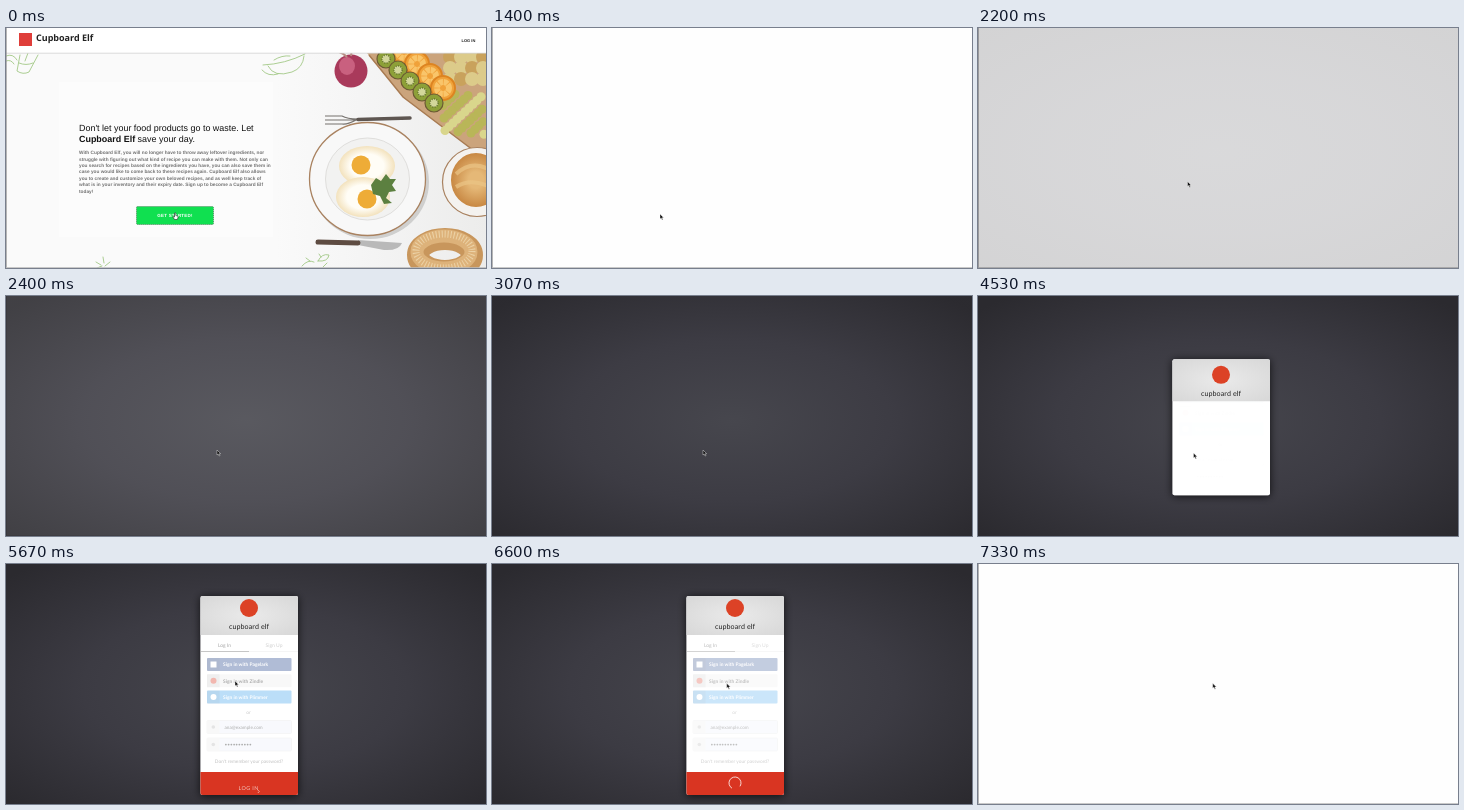
These frames come from a looping animation (480 px wide and 240 px high, 8000 ms). An HTML page:

```html
<!DOCTYPE html>
<html lang="en">
<head>
<meta charset="utf-8">
<title>Recipe app sign-in</title>
<style>
  html, body { margin: 0; width: 100%; height: 100%; overflow: hidden; background: #fff; }
  svg { display: block; width: 480px; height: 240px; text-rendering: geometricPrecision; }
  .page { font-family: "Liberation Sans", Arial, sans-serif; }
  .lock { font-family: Lato, sans-serif; }
  .mid { text-anchor: middle; }
  .doodle { fill: none; stroke: #a3c987; stroke-width: .9; stroke-linecap: round; }
</style>
</head>
<body>
<svg viewBox="0 0 480 240">
  <defs>
    <radialGradient id="dark" cy=".52" r=".68">
      <stop stop-color="#46464d"/><stop offset=".5" stop-color="#3c3b43"/><stop offset="1" stop-color="#2b2a2f"/>
    </radialGradient>
    <radialGradient id="steel" r=".75"><stop stop-color="#eaeaea"/><stop offset="1" stop-color="#d6d6d6"/></radialGradient>
    <linearGradient id="marble"><stop stop-color="#fafafa"/><stop offset=".4" stop-color="#f5f5f5"/><stop offset="1" stop-color="#ececeb"/></linearGradient>
    <radialGradient id="crust"><stop offset=".3" stop-color="#e5b877"/><stop offset="1" stop-color="#c88843"/></radialGradient>
    <radialGradient id="egg"><stop offset=".6" stop-color="#fffdf6"/><stop offset="1" stop-color="#f3e2bd"/></radialGradient>
    <clipPath id="below"><path d="M0 25H480V240H0z"/></clipPath>
    <clipPath id="cardClip"><rect id="cardShape" x="194.500" width="97.500" rx="2"/></clipPath>
    <filter id="shadow" x="-20%" y="-20%" width="140%" height="140%">
      <feDropShadow dx="0" dy="1" stdDeviation="4" flood-color="#000" flood-opacity=".75"/>
    </filter>
  </defs>
  <rect width="480" height="240" fill="#fefefe"/>

  <g id="home" class="page">
    <g clip-path="url(#below)">
      <path d="M0 25H480V240H0z" fill="#fafafa"/>
      <path d="M270 25H480V240H270z" fill="url(#marble)"/>
      <path d="M53 54H267V209H53z" fill="#fcfcfc"/>
      <g class="doodle">
        <path d="M14 27L11 43Q17 47 23 44L32 27M13 35Q20 38 27 35M22 25L19 33M0 28Q7 25 11 32M0 33Q5 31 8 36"/>
        <path d="M257 37Q279 36 299 26M262 38Q268 50 286 44Q297 40 298 28M256 42Q262 49 272 46M268 32Q276 27 284 28"/>
        <path d="M90 234L95 237M97 229L98 235M104 234L99 238M91 240L96 238"/>
        <path d="M296 238Q302 231 308 234M300 230L304 233M312 233Q316 225 323 227Q322 234 312 233M317 239L321 235M313 226L315 229"/>
      </g>

      <!-- tabletop -->
      <path d="M361 25H480V132L455 113L397 69Z" fill="#cba47c"/>
      <path d="M363 27L397 69L455 113L480 132" fill="none" stroke="#a87b52" stroke-width="1.5"/>
      <g id="fruit"></g>
      <circle cx="345" cy="43" r="16.500" fill="#a93a5b"/>
      <ellipse cx="341" cy="38" rx="8" ry="9" fill="#c9607f"/>
      <path d="M341 29Q337 25 333 24M345 28Q346 24 344 22" stroke="#b98c83" stroke-width="2" fill="none"/>
      <ellipse cx="364" cy="154" rx="59" ry="57" fill="#cfcfce"/>
      <ellipse cx="361.500" cy="151" rx="58" ry="56.500" fill="#f8f8f8" stroke="#a98260" stroke-width="1.3"/>
      <ellipse cx="361.500" cy="151" rx="42" ry="41" fill="#f2f2f1" stroke="#dfdedc"/>
      <ellipse cx="361" cy="138" rx="28" ry="20" fill="url(#egg)"/>
      <ellipse cx="357" cy="169" rx="27" ry="20" fill="url(#egg)"/>
      <circle cx="355" cy="137" r="9.500" fill="#eeac37"/><circle cx="361" cy="171" r="9.500" fill="#eeac37"/>
      <path d="M365 157L370 150L375 153L380 146L384 151L390 151L386 157L390 163L383 164L380 170L386 175L378 176L374 168L367 166Z" fill="#5c8040"/>
      <g fill="none" stroke="#77736f" stroke-width="1.200">
        <path d="M319 88H336Q341 91 352 91M319 92H352M352 91Q341 97 336 96L319 96"/>
        <path d="M352 91.500L404 90" stroke-width="3.500" stroke-linecap="round" stroke="#5e5651"/>
      </g>
      <path d="M352 212L396 215Q393 223 378 222L352 217Z" fill="#b9b9b9"/>
      <path d="M312 214L352 215" stroke="#5e4c42" stroke-width="5" stroke-linecap="round"/>
      <circle cx="471" cy="154" r="34.500" fill="#f4f2ef" stroke="#a98260" stroke-width="1.2"/>
      <ellipse cx="470" cy="152" rx="25" ry="27" fill="url(#crust)"/>
      <path d="M450 146Q465 132 482 141M450 159Q464 150 482 158" fill="none" stroke="#ecc587" stroke-width="4" opacity=".7"/>
      <ellipse cx="439" cy="227" rx="27" ry="16" fill="none" stroke="#c8965c" stroke-width="22"/>
      <ellipse cx="438" cy="224" rx="27" ry="16" fill="none" stroke="#ddb27a" stroke-width="13"/>
      <ellipse cx="438" cy="223" rx="28" ry="17" fill="none" stroke="#ecd2a6" stroke-width="7" stroke-dasharray="1 2"/>
    </g>

    <path d="M0 0H480V25H0z" fill="#fff"/>
    <path d="M0 25.200H480" stroke="#d5d5d5" stroke-width=".8"/>
    <rect x="13" y="5" width="13" height="13" fill="#df3e3a"/>
    <text x="30" y="13.300" font-family="Open Sans, sans-serif" font-size="9" font-weight="700" fill="#222">Cupboard Elf</text>
    <text x="455.500" y="13.500" font-size="4" font-weight="700" fill="#222">LOG IN</text>
    <text x="73" y="103" font-size="8.950" fill="#111">Don't let your food products go to waste. Let</text>
    <text x="73" y="114" font-size="8.950" fill="#111"><tspan font-weight="700">Cupboard Elf</tspan> save your day.</text>
    <g id="blurb" font-size="4.750" font-weight="700" fill="#727272"></g>
    <rect x="130.500" y="178.500" width="77" height="18" rx="1" fill="#10e050" stroke="#5a8a66" stroke-dasharray="1 1"/>
    <text class="mid" x="169" y="189" font-size="4.500" font-weight="700" letter-spacing=".2" fill="#fff">GET STARTED!</text>
  </g>

  <path d="M.4 0V240" stroke="#999" stroke-width=".8"/>
  <path d="M0 239.500H480" stroke="#bbb" stroke-width=".8"/>
  <rect id="veil" width="480" height="240" fill="url(#dark)"/>

  <g id="card" class="lock" filter="url(#shadow)">
    <g clip-path="url(#cardClip)">
      <path d="M194 0H292V240H194z" fill="#fff"/>
      <g id="body">
        <g class="mid" font-size="5">
          <text x="218.500" y="82.500" fill="#222">Log In</text><text x="268" y="82.500" fill="#888">Sign Up</text>
        </g>
        <path d="M195 87.500H292" stroke="#ddd" stroke-width=".7"/><path d="M195 87.500H243" stroke="#555" stroke-width=".8"/>
        <g id="social"></g>
        <text class="mid" x="242.500" y="150" font-size="4.800" fill="#777">or</text>
        <g id="fields"></g>
        <text class="mid" x="243" y="199" font-size="4.800" fill="#666">Don't remember your password?</text>
      </g>
      <rect id="head" x="194" width="98" fill="url(#steel)"/>
      <g id="brand">
        <circle cx="243" cy="0" r="9" fill="#dc4326"/>
        <text class="mid" x="243" y="21" font-size="7.100" letter-spacing=".1" fill="#222">cupboard elf</text>
      </g>
      <circle id="wait" cx="241.500" cy="155.500" r="5.500" fill="none" stroke="#aaa" stroke-width=".8" stroke-dasharray="32 2.560"/>
      <g id="foot">
        <path d="M194 208H292V232H194z" fill="#d93420"/>
        <g id="submit" fill="#fff">
          <text x="232.500" y="221.500" font-size="5.400" letter-spacing=".4">LOG IN</text>
          <path d="M251.800 221.500L253.300 223L251.800 224.500" fill="none" stroke="#fff" stroke-width=".8"/>
        </g>
        <circle id="busy" cx="243" cy="219" r="6" fill="none" stroke="#fff" stroke-width=".8" stroke-dasharray="28 9.700"/>
      </g>
    </g>
  </g>

  <path id="arrow" d="M0 0V5L1.200 4L2.100 6L3 5.600L2.100 3.700H3.700Z" fill="#111" stroke="#fff" stroke-width=".4"/>
  <path id="hand" d="M-.5 -2.500Q.3 -3.200 .8 -2.300V0L3 .6Q3.300 2.500 2.300 4H-.5L-2.200 1.200Q-1.500 .7 -.5 1.500Z" fill="#fff" stroke="#222" stroke-width=".6"/>
</svg>
<script>
const $ = id => document.getElementById(id);
const set = (id, attrs) => { for (const k in attrs) $(id).setAttribute(k, attrs[k]); };
const show = (id, opacity) => set(id, { opacity });
const disc = (x, y, r, fill, extra = "") => `<circle cx="${x}" cy="${y}" r="${r}" fill="${fill}" ${extra}/>`;

$("blurb").innerHTML = [
  "With Cupboard Elf, you will no longer have to throw away leftover ingredients, nor",
  "struggle with figuring out what kind of recipe you can make with them. Not only can",
  "you search for recipes based on the ingredients you have, you can also save them in",
  "case you would like to come back to these recipes again. Cupboard Elf also allows",
  "you to create and customize your own beloved recipes, and as well keep track of",
  "what is in your inventory and their expiry date. Sign up to become a Cupboard Elf",
  "today!"
].map((line, i) => `<text x="73" y="${126.4 + i * 6.35}">${line}</text>`).join("");

// Fruit on the board: pale berries, grapes, orange slices, then kiwi slices along the edge.
let fruit = "";
for (let i = 0; i < 12; i++)
  fruit += disc(444 + i % 4 * 11, 29 + Math.floor(i / 4) * 11, 7, i % 3 ? "#dccb8a" : "#c9a25c");
for (let i = 0; i < 34; i++)
  fruit += disc(436 + i * 13 % 43, 65 + i * 1.25, 4.5, i % 3 ? "#b9b658" : "#d9d68c");
for (let i = 0; i < 4; i++)
  fruit += disc(398 + i * 13, 24 + i * 12, 12, "#f0a23a", 'stroke="#dd8421" stroke-width="2"')
    + disc(398 + i * 13, 24 + i * 12, 6, "none", 'stroke="#f9c56a" stroke-width="6" stroke-dasharray="4 .700"');
for (let i = 0; i < 5; i++)
  fruit += disc(380 + i * 12, 31 + i * 11, 9, "#8da038", 'stroke="#6b5a33" stroke-width="1.200"')
    + disc(380 + i * 12, 31 + i * 11, 4, "#d3d79a", 'stroke="#59682a" stroke-width="1.500" stroke-dasharray=".8 1.500"');
$("fruit").innerHTML = fruit;

$("social").innerHTML = [
  ["Pagelark", "#3b5998", "#fff"], ["Zindle", "#eeeeee", "#333"], ["Plimmer", "#55acee", "#fff"]
].map(([name, bg, ink], i) => {
  const y = 94 + i * 16.3;
  const mark = i ? disc(207.5, y + 6.5, 3, i == 1 ? "#df4b37" : "#fff")
    : `<rect x="204.500" y="${y + 3.5}" width="6" height="6" fill="#fff"/>`;
  return `<rect x="201" y="${y}" width="84.500" height="13" rx="1" fill="${bg}"/>
    <path d="M201 ${y}h12.500v13h-12.500z" opacity=".1"/>${mark}
    <text x="217" y="${y + 8.3}" font-size="4.900" font-weight="700" fill="${ink}">Sign in with ${name}</text>`;
}).join("");

$("fields").innerHTML = ["ana@example.com", "••••••••••"].map((value, i) => {
  const y = 156.5 + i * 17.5;
  return `<rect x="201" y="${y}" width="84.500" height="13" rx="1" fill="#edf1fb" stroke="#ddd" stroke-width=".6"/>
    <path d="M201 ${y}h12.500v13h-12.500z" fill="#eee"/>${disc(207.3, y + 6.5, 1.8, "#bbb")}
    <text x="218.500" y="${y + 8.2}" font-size="4.700" fill="#333">${value}</text>`;
}).join("");

// Eased value through [time, value] stops.
function track(t, ...stops) {
  let [t0, v0] = stops[0];
  for (const [t1, v1] of stops) {
    if (t <= t1) {
      const p = t1 > t0 ? Math.max(0, (t - t0) / (t1 - t0)) : 0;
      return v0 + (v1 - v0) * p * p * (3 - 2 * p);
    }
    [t0, v0] = [t1, v1];
  }
  return v0;
}

function draw(t) {
  const locked = t >= 1930 && t < 7330;
  show("home", t < 1400 ? 1 : 0);
  show("veil", locked ? track(t, [1930, 0], [2130, .05], [2200, .2], [2400, .895], [2670, .98], [3200, 1]) : 0);

  const grow = track(t, [4270, 0], [4800, 1]);
  const top = 93 - 61 * grow;
  const pop = track(t, [3400, .92], [3680, 1]);
  set("card", {
    opacity: locked ? track(t, [3400, 0], [3680, 1]) : 0,
    transform: `translate(243 131) scale(${pop}) translate(-243 -131)`
  });
  set("cardShape", { y: top, height: 76 + 123 * grow });
  set("head", { y: top, height: 45 - 6 * grow });
  set("brand", { transform: `translate(0 ${top + 19 - 7 * grow})` });
  set("wait", { opacity: 1 - track(t, [4200, 0], [4400, 1]), transform: `rotate(${t * .4} 241.500 155.500)` });
  show("body", t < 5670 ? track(t, [4500, 0], [5070, 1]) : track(t, [5670, .4], [5950, .3]));
  set("foot", { transform: `translate(0 ${track(t, [4350, 24], [4800, 0])})` });

  const drop = t < 5670 ? 0 : track(t, [5670, 4.5], [5950, 14]);
  set("submit", { opacity: 1 - drop / 16, transform: `translate(0 ${drop})` });
  set("busy", { opacity: track(t, [5730, 0], [6130, .9]), transform: `rotate(${Math.min(t, 6930) * .4} 243 219)` });

  const x = track(t, [1930, 168], [2190, 209.5], [2400, 211], [3200, 211], [3700, 215.5], [4900, 215.5], [5500, 229], [5730, 229], [6130, 266], [6270, 266], [6600, 234.7]);
  const y = track(t, [1930, 186], [2190, 153.5], [2400, 154], [3200, 154], [3700, 157], [4900, 157], [5500, 117], [5730, 117], [6130, 122], [6270, 122], [6600, 119.3]);
  set("arrow", { opacity: t < 1400 ? 0 : 1, transform: `translate(${x} ${y})` });
  set("hand", { opacity: t < 1400 ? 1 : 0, transform: "translate(169 187.500)" });
}

const start = performance.now();
function tick() {
  draw((performance.now() - start) % 8000);
  requestAnimationFrame(tick);
}
tick();
</script>
</body>
</html>
```
